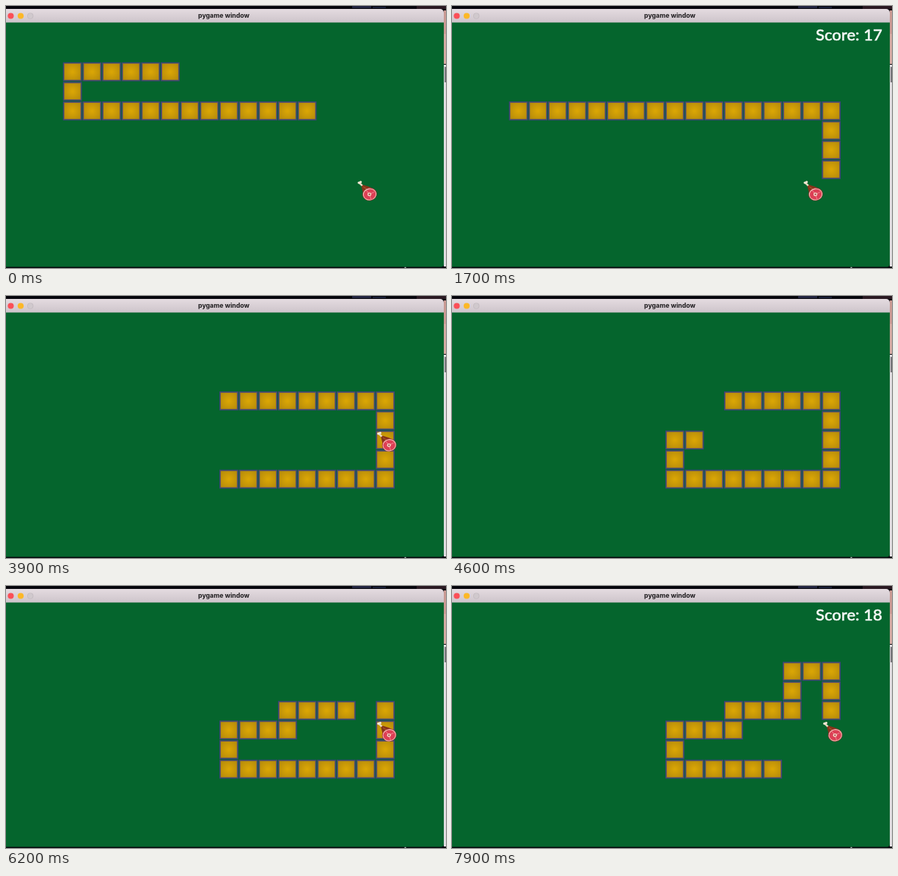
Animation, 600 px wide and 357 px high, one loop 8000 ms. Source, as an HTML page with a canvas:

```html
<!DOCTYPE html>
<html lang="en">
<head>
<meta charset="utf-8">
<title>Snake</title>
<style>
html, body { margin: 0; height: 100%; overflow: hidden; background: #000; }
canvas { display: block; }
</style>
</head>
<body>
<canvas id="stage" width="600" height="357"></canvas>
<script>
const ctx = document.getElementById('stage').getContext('2d');
const LOOP = 8000, FRAME = 100, CELL = 26.66;
const START_LENGTH = 20, MEAL = 9;          // the snake eats on this move
const STEP = { L: [-1, 0], R: [1, 0], U: [0, -1], D: [0, 1] };

// Every cell the snake visits, from its first tail to its last head.
const path = [[5, 0]];
for (const [, dir, count] of 'L5 D2 R16 D4 L8 U2 R3 U1 R3 U2 R2 D2'.matchAll(/(\w)(\d+)/g)) {
  for (let i = 0; i < +count; i++) {
    const [x, y] = path[path.length - 1];
    path.push([x + STEP[dir][0], y + STEP[dir][1]]);
  }
}

function rect(x, y, w, h, color) {
  ctx.fillStyle = color;
  ctx.fillRect(x, y, w, h);
}

function ellipse(x, y, rx, ry, color, angle = 0) {
  ctx.fillStyle = color;
  ctx.beginPath();
  ctx.ellipse(x, y, rx, ry, angle, 0, 7);
  ctx.fill();
}

function line(x1, y1, x2, y2, width, color) {
  ctx.strokeStyle = color;
  ctx.lineWidth = width;
  ctx.lineCap = 'round';
  ctx.beginPath();
  ctx.moveTo(x1, y1);
  ctx.lineTo(x2, y2);
  ctx.stroke();
}

function drawDesktop() {
  rect(0, 0, 600, 357, '#06060c');
  rect(472, 0, 26, 3, '#232540');
  rect(500, 1, 18, 2, '#1b2038');
  rect(560, 0, 40, 4, '#2a1a22');
  rect(597, 6, 3, 73, '#c99a93');
  rect(597, 38, 3, 41, '#d3aaa2');
  rect(597, 80, 3, 275, '#dfdddf');
  rect(598, 83, 2, 21, '#77767a');
  rect(543.5, 355.5, 2, 1.5, '#b9c4bd');
}

function drawWindow() {
  const bar = ctx.createLinearGradient(0, 4, 0, 23);
  bar.addColorStop(0, '#e4dbe0');
  bar.addColorStop(1, '#cdc4ca');
  ctx.fillStyle = bar;
  ctx.beginPath();
  ctx.roundRect(-6, 4, 603, 25, 5);
  ctx.fill();
  ctx.fillStyle = '#05652d';
  ctx.beginPath();
  ctx.roundRect(-6, 22.6, 603, 333, [0, 0, 4, 4]);
  ctx.fill();
  ellipse(6.5, 13.5, 4.1, 4.1, '#fb4f57');
  ellipse(20, 13.5, 4.1, 4.1, '#fcb827');
  ellipse(33.2, 13.5, 4.1, 4.1, '#bdb5ba');
  ellipse(33.2, 13.5, 3.5, 3.5, '#d0c9cd');
  ctx.fillStyle = '#1c1a1c';
  ctx.font = '700 8.75px Inter, sans-serif';
  ctx.textAlign = 'center';
  ctx.fillText('pygame window', 297, 16.3);
}

function atCell([col, row], draw) {
  ctx.save();
  ctx.translate(77.7 + col * CELL, 76.7 + row * CELL);
  draw();
  ctx.restore();
}

const gold = ctx.createRadialGradient(12.9, 12.9, 1, 12.9, 12.9, 15);
gold.addColorStop(0, '#d9a505');
gold.addColorStop(1, '#b58a0b');

function drawBlock() {
  rect(0, 0, 25.8, 25.8, '#3d4478');
  rect(1.3, 1.3, 23.2, 23.2, '#75604f');
  rect(2, 2, 21.8, 21.8, gold);
}

function drawHam() {
  line(5, 5, 12, 12, 2.6, '#e9d9bd');
  ellipse(3.8, 4.2, 1.9, 1.7, '#f3e8d4');
  ellipse(6, 3.2, 1.7, 1.5, '#f3e8d4');
  ctx.fillStyle = '#85341a';
  ctx.beginPath();
  ctx.moveTo(7, 9);
  ctx.lineTo(9.5, 7.2);
  ctx.quadraticCurveTo(18, 9, 24, 13);
  ctx.lineTo(12, 25);
  ctx.quadraticCurveTo(9, 18, 7, 9);
  ctx.fill();
  line(10, 10, 15, 13, 1, '#b0602c');
  ellipse(18.3, 19.8, 9.9, 8.8, '#a82c35', -0.15);
  ellipse(18.4, 19.9, 9.2, 8.1, '#f0c7ba', -0.15);
  ellipse(18.4, 20, 8.2, 7.1, '#dc3f55', -0.15);
  line(18, 20, 14, 15, 0.8, '#f19a9f');
  line(18, 20, 24, 17, 0.8, '#f19a9f');
  line(18, 20, 20, 26, 0.8, '#f19a9f');
  ellipse(18, 20, 2.6, 2.3, '#f6ddcb');
  ellipse(18, 20, 1.3, 1.1, '#a9434a');
}

function drawScore(score) {
  ctx.font = '500 22px Lato, sans-serif';
  ctx.textAlign = 'left';
  ctx.fillStyle = ctx.strokeStyle = '#f4f8f5';
  ctx.lineWidth = 0.5;
  ctx.fillText('Score: ' + score, 496, 47);
  ctx.strokeText('Score: ' + score, 496, 47);
}

// Moves made so far; the game stalls briefly, then catches up.
function movesAt(t) {
  const rate = 0.003885;
  return t < 800 ? 0.5 + Math.min(t, 600) * rate : 4.37 + (t - 800) * rate;
}

function render(now) {
  const t = Math.floor(now % LOOP / FRAME) * FRAME;
  const moves = movesAt(t), n = Math.floor(moves);
  const phase = Math.floor((moves - n) * 3);  // each move shows snake, then food, then score
  const fed = n > MEAL ? 1 : 0;
  const head = START_LENGTH + n;

  drawDesktop();
  drawWindow();
  for (const cell of path.slice(head - START_LENGTH - fed, head)) atCell(cell, drawBlock);
  if (phase > 0) atCell(fed ? [16, 4] : [15, 6], drawHam);
  if (phase > 1) drawScore(17 + fed);
}

const start = performance.now();
function tick() {
  render(performance.now() - start);
  requestAnimationFrame(tick);
}
tick();
</script>
</body>
</html>
```
